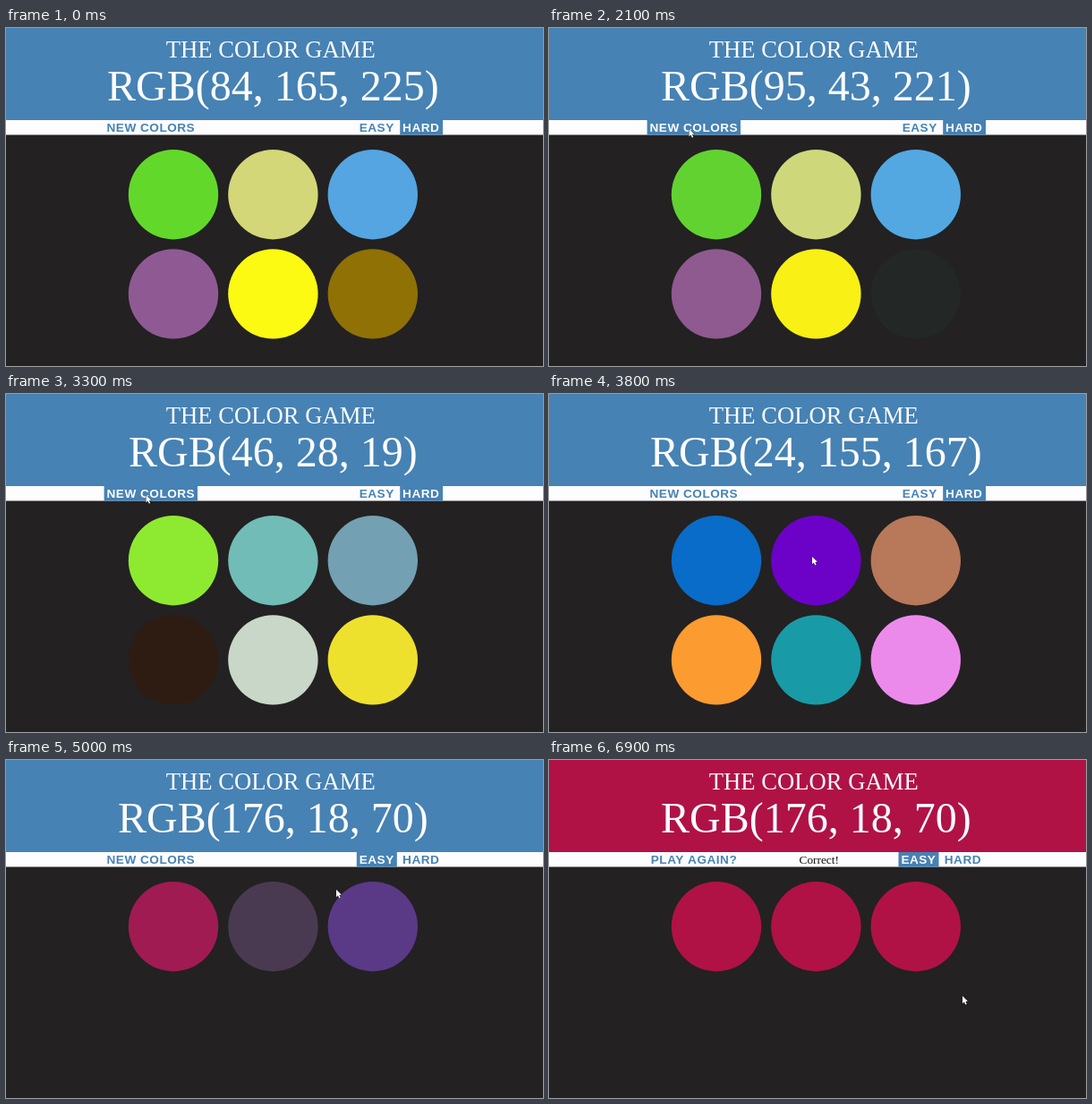
Animation of 600x378 px, one loop 7.1 s. Source, as an HTML page with a canvas:

```html
<!DOCTYPE html>
<html lang="en">
<head>
<meta charset="utf-8">
<title>The Color Game</title>
<style>
  html, body { margin: 0; width: 100%; height: 100%; overflow: hidden; background: #232122; }
  canvas { display: block; width: 600px; height: 378px; }
</style>
</head>
<body>
<canvas id="stage" width="600" height="378"></canvas>
<script>
const ctx = document.getElementById('stage').getContext('2d');
const LOOP = 7100, STEP = 100, FADE = 420, TRAVEL = 400;
const BLUE = '#4682b4', WHITE = '#fdfdff', DARK = '#232122';
const SERIF = '"Liberation Serif", "Times New Roman", serif';
const SANS = '"Liberation Sans", Arial, sans-serif';
const BAR = { top: 103, bottom: 119.5, baseline: 115.5 };

const clamp = v => Math.max(0, Math.min(1, v));
const ease = v => v * v * (3 - 2 * v);
const mix = (a, b, p) => a + (b - a) * p;
const channels = hex => hex.match(/\w\w/g).map(pair => parseInt(pair, 16));
const blend = (from, to, p) => {
  const target = channels(to);
  return `rgb(${channels(from).map((v, k) => Math.round(mix(v, target[k], p)))})`;
};
const spot = i => ({ x: 187 + 111.4 * (i % 3), y: i < 3 ? 186.2 : 297.4 });

// A new round deals colors; a pick either hides one circle or wins the round.
const deal = (at, goalIndex, ...colors) =>
  ({ at, colors, goal: colors[goalIndex], easy: colors.length === 3 });
const miss = (at, round, picked) =>
  ({ ...round, at, message: 'Try Again', colors: round.colors.map((c, i) => i === picked ? DARK : c) });
const hit = (at, round) =>
  ({ ...round, at, message: 'Correct!', won: true, colors: round.colors.map(() => round.goal) });

const opening = deal(0, 2, '#62d92a', '#d3d777', '#54a5e1', '#8f5a94', '#fcfa12', '#8f7105');
const finale = deal(4660, 0, '#b01246', '#464044', '#50328c');
const states = [
  opening,
  miss(860, opening, 5),
  deal(2050, 0, '#5f2bdd', '#5cf8d6', '#32f7d6', '#7a5c08', '#b8046b', '#1ec38c'),
  deal(2750, 3, '#8eea30', '#71bcb6', '#73a0b2', '#2e1c13', '#c8d7c8', '#eee12d'),
  deal(3340, 4, '#086cc8', '#6c02c8', '#b8785a', '#fc9b30', '#189ba7', '#ec8aec'),
  finale,
  hit(5800, finale)
];

// The pointer rests at each stop, then glides to arrive at the next one on time.
const stops = [
  { at: 100, x: 536, y: 348 },
  { at: 750, ...spot(5) },
  { at: 1800, x: 156.5, y: 113 },
  { at: 3800, x: 294, y: 182 },
  { at: 4450, x: 415, y: 111 },
  { at: 5000, x: 369, y: 145 },
  { at: 5600, ...spot(0) },
  { at: 6700, x: 462, y: 264 }
];

function pointerAt(t) {
  if (t < stops[0].at) return null;
  return stops.reduce((a, b) => {
    const p = ease(clamp(1 - (b.at - t) / TRAVEL));
    return { x: mix(a.x, b.x, p), y: mix(a.y, b.y, p) };
  });
}

function text(str, x, y, font, color, align = 'center', spacing = 0) {
  ctx.font = font;
  ctx.fillStyle = color;
  ctx.textAlign = align;
  ctx.letterSpacing = spacing + 'px';
  ctx.fillText(str, x, y);
}

function button(label, x, width, pointer, selected) {
  const hovered = pointer && pointer.y > BAR.top && pointer.y < BAR.bottom
    && pointer.x > x && pointer.x < x + width;
  const active = selected || hovered;
  if (active) {
    ctx.fillStyle = BLUE;
    ctx.fillRect(x, BAR.top, width, BAR.bottom - BAR.top);
  }
  text(label, x + 2.9, BAR.baseline, `bold 13.6px ${SANS}`, active ? WHITE : BLUE, 'left', 0.5);
}

function drawPointer({ x, y }) {
  const arrow = new Path2D('M0 0V8.2L1.9 6.6 3.3 9.6 4.7 8.9 3.4 6 5.8 5.8Z');
  ctx.save();
  ctx.translate(x, y);
  ctx.strokeStyle = '#222';
  ctx.stroke(arrow);
  ctx.fillStyle = '#fff';
  ctx.fill(arrow);
  ctx.restore();
}

function draw(t) {
  const index = states.findLastIndex(s => s.at <= t);
  const state = states[index], before = states[Math.max(0, index - 1)];
  const fade = ease(clamp((t - state.at) / FADE));
  const pointer = pointerAt(t);

  ctx.fillStyle = DARK;
  ctx.fillRect(0, 0, 600, 378);
  ctx.fillStyle = state.won ? state.goal : BLUE;
  ctx.fillRect(0, 0, 600, BAR.top);
  ctx.fillStyle = WHITE;
  ctx.fillRect(0, BAR.top, 600, BAR.bottom - BAR.top);

  text('THE COLOR GAME', 295.7, 33.4, `26.67px ${SERIF}`, WHITE);
  text(`RGB(${channels(state.goal).join(', ')})`, 298.4, 81.2, `48px ${SERIF}`, WHITE);

  const shift = state.won ? 1.3 : 0;
  button(state.won ? 'PLAY AGAIN?' : 'NEW COLORS', 109.6 + shift, 104.4, pointer, false);
  button('EASY', 391.8 - shift, 45, pointer, state.easy);
  button('HARD', 440.2 - shift, 47.8, pointer, !state.easy);
  if (state.message) text(state.message, 301.7, BAR.baseline, `13.33px ${SERIF}`, '#111');

  state.colors.forEach((color, i) => {
    const { x, y } = spot(i);
    ctx.fillStyle = blend(before.colors[i], color, fade);
    ctx.beginPath();
    ctx.arc(x, y, 50.2, 0, Math.PI * 2);
    ctx.fill();
  });

  if (pointer) drawPointer(pointer);
}

const start = performance.now();
function tick() {
  const t = (performance.now() - start) % LOOP;
  draw(Math.min(LOOP - 2 * STEP, Math.floor(t / STEP) * STEP));
  requestAnimationFrame(tick);
}
tick();
</script>
</body>
</html>
```
